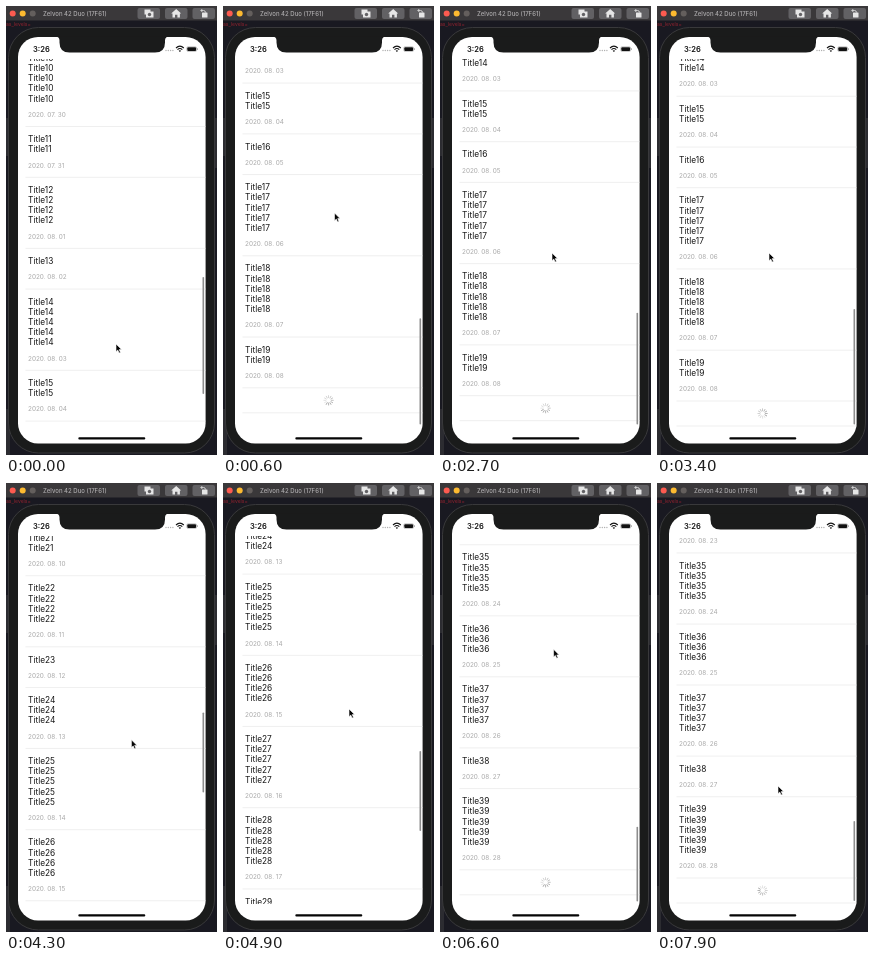
An HTML page for the animation above (8000 ms loop, 211x449 px).

```html
<!DOCTYPE html>
<html lang="en">
<head>
<meta charset="utf-8">
<title>Endless list</title>
<style>
  html, body { margin: 0; width: 100%; height: 100%; overflow: hidden; background: #191921; }
  svg { display: block; width: 211px; height: 449px; font-family: Inter, Roboto, sans-serif; }
  .title { font-size: 8.35px; fill: #161616; }
  .date { font-size: 6.4px; fill: #a9a9a9; }
  .line { stroke: #e4e4e4; stroke-width: .6; }
</style>
</head>
<body>
<svg viewBox="0 0 211 449">
  <defs>
    <clipPath id="safe"><rect x="12" y="53" width="188" height="368"/></clipPath>
  </defs>

  <!-- editor behind the window -->
  <rect width="211" height="449" fill="#191921"/>
  <path d="M0 112H4V150H0ZM207 112H211V162H207ZM0 403H4V449H0Z" fill="#2c2c31"/>
  <text x="0" y="20" font-size="5" fill="#93222f">as_levels=</text>

  <!-- title bar -->
  <rect width="211" height="14.5" fill="#3a383a"/>
  <circle cx="6.7" cy="7.5" r="3" fill="#fd5b50"/>
  <circle cx="16.7" cy="7.5" r="3" fill="#fdba30"/>
  <circle cx="26.7" cy="7.5" r="3" fill="#645f5d"/>
  <text x="37" y="9.8" font-size="6" font-weight="500" fill="#aeacae">Zelvon 42 Duo (17F61)</text>
  <g fill="#626164">
    <rect x="131.5" y="2" width="22.5" height="11" rx="2"/>
    <rect x="159" y="2" width="22.5" height="11" rx="2"/>
    <rect x="186.500" y="2" width="22.5" height="11" rx="2"/>
  </g>
  <g fill="#e6e6e6">
    <path d="M138.500 3.500h6v2h3v6h-7.500v-3h-1.500z"/>
    <circle cx="143.500" cy="8.500" r="1.700" fill="#626164"/>
    <path d="M170.200 3l5 4.600h-1.300v4h-2.500v-2.800h-2.400v2.800h-2.500v-4h-1.300z"/>
    <rect x="196" y="6.500" width="5.500" height="5" rx=".5"/>
    <path d="M195 4.500h2.500q2 0 2 2M196.300 3l-1.500 1.500 1.500 1.500" fill="none" stroke="#e6e6e6" stroke-width=".8"/>
  </g>

  <!-- device -->
  <rect x="2.5" y="21.5" width="206" height="425.5" rx="30" fill="#1a1b1b" stroke="#39393b"/>
  <rect x="12" y="31" width="187.6" height="406.4" rx="20" fill="#fff"/>
  <path d="M49 30.5q4.500 0 4.500 4v2q0 10 10 10h85.500q10 0 10-10v-2q0-4 4.500-4z" fill="#1a1b1b"/>

  <!-- status bar -->
  <text x="27" y="45.700" font-size="7.6" font-weight="600" fill="#111">3:26</text>
  <path d="M160 44.500h7" stroke="#b0b0b0" stroke-width="1.400" stroke-linecap="round" stroke-dasharray="0 2.300"/>
  <path d="M170 42q3.900-3.600 7.800 0M171.500 43.600q2.400-2.200 4.800 0" fill="none" stroke="#111" stroke-width="1.100"/>
  <path d="M172.700 44.700q1.200-.9 2.400 0l-1.200 1.300z" fill="#111"/>
  <rect x="180.700" y="40.700" width="10" height="4.800" rx="1.400" fill="none" stroke="#999" stroke-width=".5"/>
  <rect x="181.300" y="41.300" width="8.800" height="3.600" rx=".9" fill="#111"/>
  <rect x="191.200" y="42.200" width=".7" height="1.800" fill="#999"/>

  <g clip-path="url(#safe)">
    <g id="list">
      <g id="page1"></g>
      <g id="page2"></g>
      <g id="spinner"></g>
    </g>
  </g>
  <rect id="bar" x="196.5" width="1.6" rx=".8" fill="#8d8d8d"/>
  <rect x="72.3" y="431.3" width="67" height="2.2" rx="1.1" fill="#050505"/>
  <path id="cursor" d="M0 0V7.700L1.800 6.100L3.100 9L4.500 8.400L3.200 5.600H5.600Z" fill="#050505" stroke="#fff" stroke-width=".6"/>
</svg>

<script>
const $ = id => document.getElementById(id);
const LOOP = 8000, STEP = 100, LOADED = 3600;
const LINE = 10.15, PAD = 30.5, SPINNER = 25, BOTTOM = 420;

function add(parent, tag, attrs, text) {
  const el = document.createElementNS("http://www.w3.org/2000/svg", tag);
  for (const k in attrs) el.setAttribute(k, attrs[k]);
  if (text) el.textContent = text;
  parent.append(el);
  return el;
}

const rule = (parent, y) => add(parent, "line", { class: "line", x1: 19.5, x2: 199.6, y1: y, y2: y });

// Lines of text in each row, from row 10; y = 0 is the bottom edge of that row.
const counts = "524152155232413545532345243415";
const pageEnd = [];
let y = -(PAD + counts[0] * LINE);
[...counts].forEach((count, i) => {
  const n = i + 10, page = $(n < 20 ? "page1" : "page2");
  for (let k = 0; k < count; k++)
    add(page, "text", { class: "title", x: 22, y: y + 15.7 + k * LINE }, "Title" + n);
  y += PAD + count * LINE;
  const day = new Date(2020, 6, 20 + n);
  const two = v => String(v).padStart(2, "0");
  add(page, "text", { class: "date", x: 22, y: y - 9.8 },
    `2020. ${two(day.getMonth() + 1)}. ${two(day.getDate())}`);
  rule(page, y);
  if (n % 20 === 19) pageEnd.push(y);
});

const spokes = Array.from({ length: 12 }, (_, i) => add($("spinner"), "line", {
  x1: 105.6, x2: 105.6, y1: 7.8, y2: 9.8, stroke: "#888", "stroke-width": .8,
  "stroke-linecap": "round", transform: `rotate(${i * 30} 105.6 12.5)`
}));
rule($("spinner"), SPINNER);

// Offset at which each page rests on its spinner row.
const rest = pageEnd.map(end => BOTTOM - end - SPINNER);

// Moves are [start, end, ...goal]; the value holds still between them.
const scrolls = [
  [0, 700, rest[0] - 14], [700, 1500, rest[0]],
  [1800, 2100, rest[0] + 39], [2100, 2400, rest[0] - 18], [2400, 3300, rest[0]],
  [4000, 4900, -741.9], [5000, 5500, -1010], [5600, 5900, -1184.9],
  [5900, 6400, rest[1] - 16], [6400, 7400, rest[1]]
];
const points = [
  [0, 300, 111.5, 207], [1500, 2100, 117.5, 322], [2100, 2500, 112, 247],
  [3400, 3600, 124, 330], [4000, 4900, 126, 226],
  [5600, 5900, 106.5, 36], [6400, 7400, 121, 303]
];

function follow(from, moves, t) {
  return moves.reduce((at, [start, end, ...goal]) => {
    const u = Math.min(1, Math.max(0, (t - start) / (end - start)));
    const eased = 1 - (1 - u) ** 3;
    return at.map((v, i) => v + (goal[i] - v) * eased);
  }, from);
}

// Distance left to the end of the page sets the indicator's place.
function indicator(offset, loaded) {
  const left = offset - rest[+loaded];
  const full = loaded ? 80 : 117;
  const end = loaded ? 338 : 303;
  const top = left < 0 ? end - .7 * left
    : end - (loaded ? 70 * (left / 712) ** 2 : .117 * left);
  return [top, Math.min(418.5, top + full)];
}

function draw(now) {
  const t = Math.floor(now % LOOP / STEP) * STEP;
  const loaded = t >= LOADED;
  const [offset] = follow([120.5], scrolls, t);
  const [cx, cy] = follow([110, 338], points, t);
  const [top, bottom] = indicator(offset, loaded);
  $("list").setAttribute("transform", `translate(0 ${offset})`);
  $("page2").setAttribute("visibility", loaded ? "visible" : "hidden");
  $("spinner").setAttribute("transform", `translate(0 ${pageEnd[+loaded]})`);
  const head = Math.floor(t / 1000 * 12);
  spokes.forEach((s, i) =>
    s.setAttribute("opacity", .85 - .6 * ((head - i + 12) % 12) / 11));
  $("bar").setAttribute("y", top);
  $("bar").setAttribute("height", bottom - top);
  $("cursor").setAttribute("transform", `translate(${cx} ${cy})`);
}

const start = performance.now();
function tick() {
  draw(performance.now() - start);
  requestAnimationFrame(tick);
}
tick();
</script>
</body>
</html>
```
